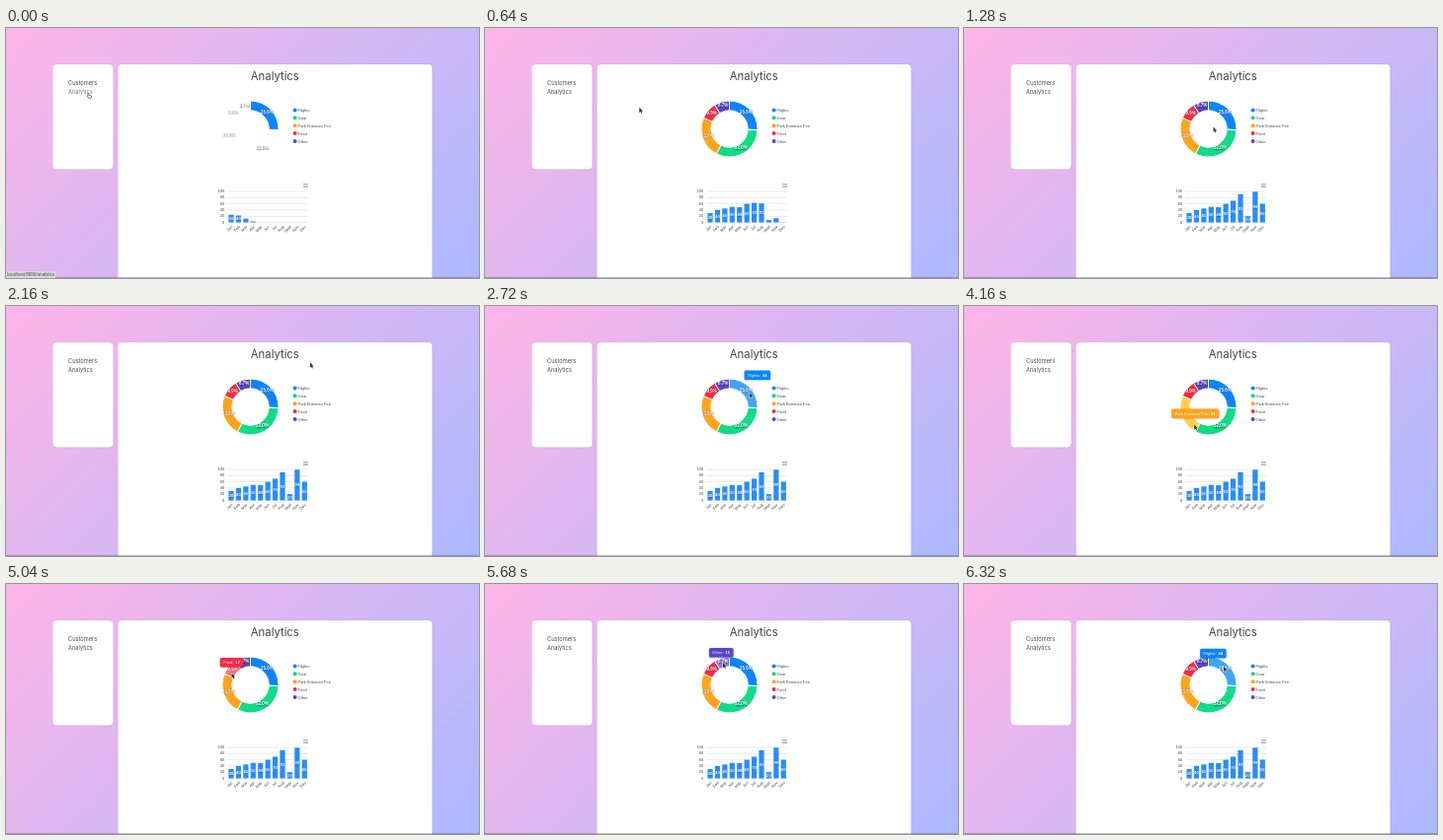
An HTML page with a canvas for the animation above (6400 ms loop, 479 by 254 pixels).

```html
<!DOCTYPE html>
<html lang="en">
<head>
<meta charset="utf-8">
<title>Analytics</title>
<style>
html, body { margin: 0; width: 100%; height: 100%; overflow: hidden; }
canvas { display: block; width: 479px; height: 254px; }
</style>
</head>
<body>
<canvas id="stage"></canvas>
<script>
const W = 479, H = 254, LOOP = 6400, STEP = 80;
const SANS = '"Liberation Sans", Arial, sans-serif';
const UI = 'Inter, sans-serif';
const canvas = document.getElementById('stage');
const ctx = canvas.getContext('2d');
const dpr = window.devicePixelRatio || 1;
canvas.width = W * dpr;
canvas.height = H * dpr;
ctx.scale(dpr, dpr);

const slices = [
  { name: 'Flights', value: 44, color: '#0a84ff', hover: '#40a5fa' },
  { name: 'Gear', value: 55, color: '#0fdc86', hover: '#5cf5b4' },
  { name: 'Park Entrance Fee', value: 41, color: '#ffa41c', hover: '#ffd04f' },
  { name: 'Food', value: 17, color: '#fb2846', hover: '#ff7187' },
  { name: 'Other', value: 15, color: '#5a46ca', hover: '#8d7ee0' }
];
const total = slices.reduce((sum, s) => sum + s.value, 0);
let turn = 0;
for (const s of slices) {
  s.start = turn;
  turn += s.value / total;
  s.end = turn;
}

const months = ['Jan', 'Feb', 'Mar', 'Apr', 'May', 'Jun', 'Jul', 'Aug', 'Sept', 'Nov', 'Dec'];
const amounts = [30, 40, 45, 50, 49, 60, 70, 91, 20, 99, 60];

const donut = { x: 247.5, y: 102.5, outer: 28.5, inner: 18.7, label: 23.5 };
const plot = { left: 224.3, right: 306, top: 166, base: 197.5 };

// Pointer waypoints: time, x, y
const path = [
  [0, 83, 66], [240, 84, 66], [1120, 252.5, 100.5], [1360, 252.5, 100.5],
  [2080, 308, 57.5], [2240, 308, 57.5], [2720, 268, 88], [3280, 264, 120.5],
  [3440, 263, 121], [4080, 233.5, 121], [4320, 232, 119], [4960, 228.5, 91],
  [5120, 228.5, 90], [5680, 241, 80], [6000, 243, 81], [6400, 265, 84]
];

const clamp = v => Math.max(0, Math.min(1, v));
const easeInOut = v => 0.5 - Math.cos(Math.PI * clamp(v)) / 2;

function pointerAt(t) {
  const i = Math.max(1, path.findIndex(p => p[0] >= t));
  const [t0, x0, y0] = path[i - 1], [t1, x1, y1] = path[i];
  const k = easeInOut((t - t0) / (t1 - t0));
  return { x: x0 + (x1 - x0) * k, y: y0 + (y1 - y0) * k };
}

function sliceUnder(p) {
  const dx = p.x - donut.x, dy = p.y - donut.y, r = Math.hypot(dx, dy);
  if (r < donut.inner || r > donut.outer) return null;
  const at = (Math.atan2(dx, -dy) / (2 * Math.PI) + 1) % 1;
  return slices.find(s => at >= s.start && at < s.end);
}

function text(str, x, y, size, color, { font = SANS, weight = 400, align = 'left' } = {}) {
  ctx.font = `${weight} ${size}px ${font}`;
  ctx.textAlign = align;
  ctx.textBaseline = 'alphabetic';
  ctx.fillStyle = color;
  ctx.fillText(str, x, y);
}

function box(x, y, w, h, r, color) {
  ctx.fillStyle = color;
  ctx.beginPath();
  ctx.roundRect(x, y, w, h, r);
  ctx.fill();
}

function withShadow(color, blur, offset, paint) {
  ctx.save();
  ctx.shadowColor = color;
  ctx.shadowBlur = blur * dpr;
  ctx.shadowOffsetX = ctx.shadowOffsetY = offset * dpr;
  paint();
  ctx.restore();
}

function drawPage(onLink) {
  const g = ctx.createLinearGradient(56.25, -56.25, 422.75, 310.25);
  g.addColorStop(0, '#ffb5e7');
  g.addColorStop(1, '#abb9ff');
  ctx.fillStyle = g;
  ctx.fillRect(0, 0, W, H);
  withShadow('rgba(90,70,130,.18)', 2, 0.3, () => {
    box(47.5, 37, 61, 106.5, 4, '#fff');
    box(113.5, 37, 318, 230, 4, '#fff');
  });
  text('Customers', 63, 58.4, 5.7, '#4c4c50', { font: UI });
  text('Analytics', 63, 67.4, 5.7, onLink ? '#737b8c' : '#4c4c50', { font: UI });
  text('Analytics', 272.3, 52.5, 11.3, '#434347', { font: UI, align: 'center' });
}

function drawDonut(t, hovered) {
  const swept = slices[0].end + t / 540;
  for (const s of slices) {
    const k = easeInOut((swept - s.start) / (s.end - s.start));
    if (k <= 0) continue;
    const a0 = (s.start - 0.25) * 2 * Math.PI;
    const a1 = a0 + (s.end - s.start) * k * 2 * Math.PI;
    ctx.beginPath();
    ctx.arc(donut.x, donut.y, donut.outer, a0, a1);
    ctx.arc(donut.x, donut.y, donut.inner, a1, a0, true);
    ctx.closePath();
    ctx.fillStyle = s === hovered ? s.hover : s.color;
    ctx.fill();
    ctx.strokeStyle = '#fff';
    ctx.lineWidth = 1;
    ctx.stroke();
  }
  withShadow('rgba(0,0,0,.6)', 1, 0.4, () => {
    for (const s of slices) {
      const a = (s.start + s.end) * Math.PI;
      text((s.value / total * 100).toFixed(1) + '%',
        donut.x + Math.sin(a) * donut.label, donut.y - Math.cos(a) * donut.label + 0.6,
        4.5, '#fff', { weight: 700, align: 'center' });
    }
  });
  slices.forEach((s, i) => {
    const y = 83.4 + i * 7.9;
    ctx.fillStyle = s.color;
    ctx.beginPath();
    ctx.arc(292.6, y, 2, 0, 2 * Math.PI);
    ctx.fill();
    text(s.name, 295.6, y + 1.5, 4, '#3d4348');
  });
}

function drawBars(t) {
  const span = plot.base - plot.top;
  for (let v = 0; v <= 100; v += 20) {
    const y = plot.base - span * v / 100;
    ctx.fillStyle = '#dedede';
    ctx.fillRect(plot.left, y - 0.25, plot.right - plot.left, 0.6);
    text(v, 221.2, y + 1, 4, '#3d4348', { align: 'right' });
  }
  const pitch = (plot.right - plot.left) / months.length;
  months.forEach((month, i) => {
    const x = plot.left + pitch * (i + 0.5);
    const h = span * amounts[i] / 100 * easeInOut((t + 390 - i * 100) / 540);
    ctx.fillStyle = '#268df9';
    ctx.fillRect(x - 2.6, plot.base - h, 5.2, h);
    if (h > 6) {
      withShadow('rgba(0,0,0,.3)', 0.8, 0.3, () =>
        text(amounts[i], x, plot.base - h / 2 + 1.5, 4.2, '#fff', { weight: 700, align: 'center' }));
    }
    ctx.save();
    ctx.translate(x + 1.8, 202.3);
    ctx.rotate(-Math.PI / 4);
    text(month, 0, 0, 4, '#3d4348', { align: 'right' });
    ctx.restore();
  });
  ctx.fillStyle = '#8b979e';
  for (let i = 0; i < 3; i++) ctx.fillRect(301, 158.3 + i * 1.4, 5, 0.7);
}

function drawTooltip(slice, p) {
  const label = slice.name + ':';
  ctx.font = `400 4px ${SANS}`;
  const labelWidth = ctx.measureText(label).width;
  const w = labelWidth + 13.5, x = p.x - w / 2, y = p.y - 16.5;
  withShadow('rgba(0,0,0,.3)', 2, 0.5, () => box(x, y, w, 9.5, 1.5, slice.color));
  text(label, x + 3.5, y + 6, 4, '#fff');
  text(slice.value, x + labelWidth + 5.5, y + 6, 4, '#fff', { weight: 700 });
}

function drawArrow({ x, y }) {
  ctx.save();
  ctx.translate(x, y);
  const arrow = new Path2D('M0 0V5.2L1.2 4.1L2 6L2.9 5.6L2.1 3.8H3.7Z');
  ctx.lineJoin = 'round';
  ctx.lineWidth = 0.9;
  ctx.strokeStyle = '#fff';
  ctx.stroke(arrow);
  ctx.fillStyle = '#333';
  ctx.fill(arrow);
  ctx.restore();
}

function drawHand({ x, y }) {
  ctx.save();
  ctx.translate(x, y);
  const hand = new Path2D('M0 .4Q.5-.3 1 .4V2.2L3 2.7Q3.7 2.9 3.5 3.7L3 5.4H.6L-1 3.2Q-.8 2.5 0 3Z');
  ctx.fillStyle = '#fff';
  ctx.fill(hand);
  ctx.lineWidth = 0.6;
  ctx.strokeStyle = '#333';
  ctx.stroke(hand);
  ctx.restore();
}

function draw(t) {
  const pointer = pointerAt(t);
  const onLink = pointer.x < 90;
  const hovered = sliceUnder(pointer);
  drawPage(onLink);
  drawDonut(t, hovered);
  drawBars(t);
  // The tooltip trails slightly behind the pointer.
  if (hovered) drawTooltip(hovered, pointerAt(Math.max(0, t - 140)));
  (onLink ? drawHand : drawArrow)(pointer);
  ctx.fillStyle = 'rgba(70,70,80,.5)';
  ctx.fillRect(0, 253.3, W, 0.7);
  if (onLink) {
    box(-2, 247.3, 52, 9, 1.5, '#d9dade');
    text('localhost:8080/analytics', 1.2, 252.3, 4.5, '#46484c');
  }
}

function tick() {
  const t = performance.now() % LOOP;
  draw(Math.floor(t / STEP) * STEP);
  requestAnimationFrame(tick);
}
tick();
</script>
</body>
</html>
```
